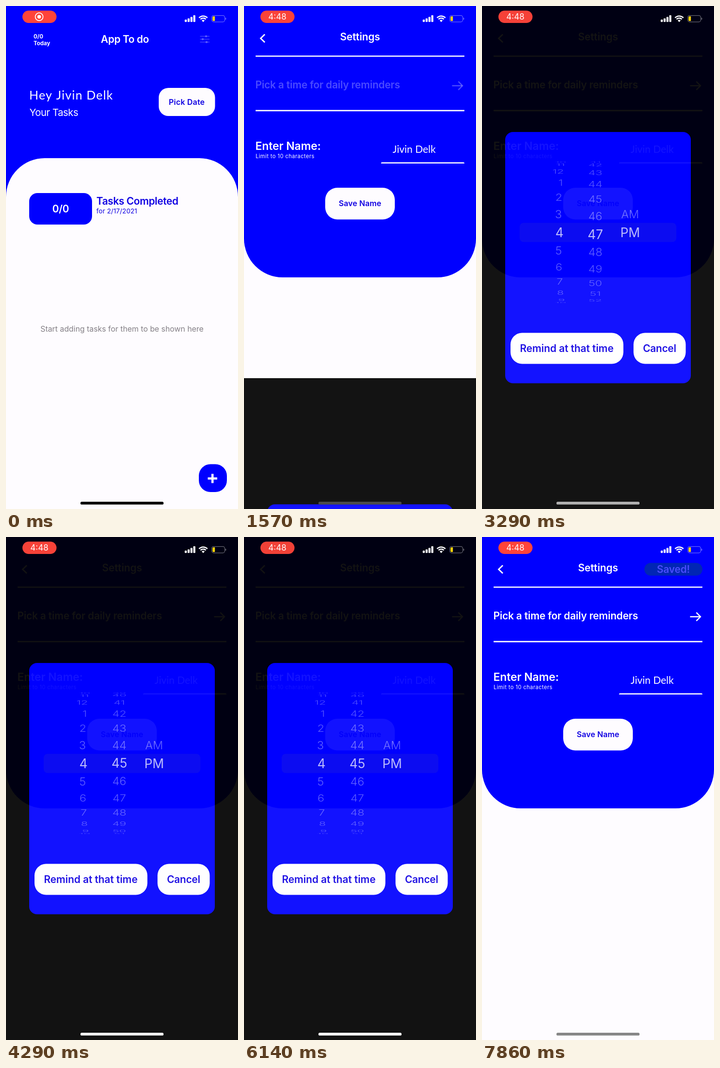
Recreate the animation shown at these times as an HTML page with a canvas. Size 480 by 1038 pixels, loop 8000 ms.

```html
<!DOCTYPE html>
<html lang="en">
<head>
<meta charset="utf-8">
<title>To-do app settings</title>
<style>
html, body { margin: 0; width: 100%; height: 100%; overflow: hidden; background: #fefcff; }
canvas { display: block; width: 480px; height: 1038px; }
</style>
</head>
<body>
<canvas id="stage" width="480" height="1038"></canvas>
<script>
const W = 480, H = 1038, LOOP = 8000;
const BLUE = '#0000ff', INK = '#1000e2', PAPER = '#fefcff', WHITE = '#ffffff';
const SANS = 'Inter, "Liberation Sans", sans-serif';
const HAND = 'Lato, "Open Sans", sans-serif';
const NAME = 'Jivin Delk';

const screen = document.getElementById('stage').getContext('2d');
const layer = document.createElement('canvas');
layer.width = W;
layer.height = H;
const layerCtx = layer.getContext('2d');
let ctx = screen;

// ---- timing ----
const clamp = (v) => Math.max(0, Math.min(1, v));
const ramp = (t, from, to) => clamp((t - from) / (to - from));
const smooth = (u) => u * u * (3 - 2 * u);
const inOut = (u) => u < 0.5 ? 2 * u * u : 1 - 2 * (1 - u) * (1 - u);

// Critically damped spring from 0 to 1
function spring(t, start) {
  const w = 0.0178 * Math.max(0, t - start);
  return 1 - (1 + w) * Math.exp(-w);
}

// Opacity of a touchable that dims while held
function touch(t, down, up) {
  if (t < up) return 1 - 0.75 * inOut(ramp(t, down, down + 150));
  return 0.25 + 0.75 * inOut(ramp(t, up, up + 250));
}

function track(t, points) {
  for (let i = 1; i < points.length; i++) {
    const [t0, v0] = points[i - 1], [t1, v1] = points[i];
    if (t <= t1) return v0 + (v1 - v0) * ramp(t, t0, t1);
  }
  return points[points.length - 1][1];
}

// ---- drawing helpers ----
function box(x0, y0, x1, y1, r, color) {
  ctx.fillStyle = color;
  ctx.beginPath();
  ctx.roundRect(x0, y0, x1 - x0, y1 - y0, r);
  ctx.fill();
}

function line(points, width, color, cap = 'butt') {
  ctx.strokeStyle = color;
  ctx.lineWidth = width;
  ctx.lineCap = cap;
  ctx.lineJoin = 'miter';
  ctx.beginPath();
  points.forEach(([x, y]) => ctx.lineTo(x, y));
  ctx.stroke();
}

function dot(x, y, r, color) {
  ctx.fillStyle = color;
  ctx.beginPath();
  ctx.arc(x, y, r, 0, 7);
  ctx.fill();
}

function text(str, x, y, size, color, { weight = 400, align = 'left', gap = 0, face = SANS } = {}) {
  ctx.font = `${weight} ${size}px ${face}`;
  ctx.letterSpacing = gap + 'px';
  ctx.textAlign = align;
  ctx.fillStyle = color;
  ctx.fillText(str, x, y);
}

const title = (str, x, y, color, align = 'left', gap = -0.25) =>
  text(str, x, y, 20.9, color, { weight: 600, align, gap });

function faded(alpha, draw) {
  ctx.save();
  ctx.globalAlpha *= alpha;
  draw();
  ctx.restore();
}

// Draws a group flat, then blends it as one picture
function grouped(alpha, y, draw) {
  ctx = layerCtx;
  ctx.clearRect(0, 0, W, H);
  draw();
  ctx = screen;
  faded(alpha, () => ctx.drawImage(layer, 0, y));
}

// ---- screens ----
function drawHome(t) {
  box(0, 0, W, H, 0, BLUE);
  box(0, 314, W, H, [80, 80, 0, 0], PAPER);
  text('0/0', 57, 67, 11.5, WHITE, { weight: 700 });
  text('Today', 57, 81, 11.5, WHITE, { weight: 700 });
  title('App To do', 246, 76, WHITE, 'center', -0.35);
  faded(touch(t, -400, 90), () => {
    [[62.5, 414], [68.5, 407], [74.5, 415]].forEach(([y, x]) => {
      line([[402, y], [420.5, y]], 1.5, WHITE, 'round');
      dot(x, y, 2.2, WHITE);
    });
  });
  text('Hey ' + NAME, 48, 193, 25, WHITE, { face: HAND, gap: 1.2 });
  text('Your Tasks', 48.5, 227, 20.4, WHITE, { gap: -0.5 });

  box(316, 169, 432.5, 227, 20, PAPER);
  text('Pick Date', 374, 204, 16, INK, { weight: 600, align: 'center', gap: 0.2 });
  box(48, 386, 178, 451, 17, BLUE);
  title('0/0', 113, 426, WHITE, 'center');
  title('Tasks Completed', 187, 409.5, INK, 'left', -0.35);
  text('for 2/17/2021', 187, 428, 13.5, INK, { gap: 0.1 });
  text('Start adding tasks for them to be shown here', 240, 671.5, 15.9, '#858087', { align: 'center', gap: -0.01 });

  box(399, 945.5, 457, 1003, 24, BLUE);
  line([[417.5, 975], [437, 975]], 4.6, WHITE);
  line([[427.2, 965.5], [427.2, 984.5]], 4.6, WHITE);
}

function drawSettings(t) {
  box(0, 0, W, H, 0, PAPER);
  box(0, 0, W, 560, [0, 0, 80, 80], BLUE);
  line([[43, 58.5], [34.5, 66.8], [43, 75]], 2.8, WHITE);
  title('Settings', 240, 71, WHITE, 'center', -0.1);
  box(24, 102.2, 456, 104.8, 0, WHITE);
  box(24, 214.6, 456, 217.2, 0, WHITE);

  faded(touch(t, 1300, 1530), () => {
    title('Pick a time for daily reminders', 23.5, 170, WHITE, 'left', -0.18);
    line([[430.5, 164.5], [451.5, 164.5]], 2.5, WHITE);
    line([[443.5, 155.8], [452, 164.5], [443.5, 173.2]], 2.5, WHITE);
  });

  text('Enter Name:', 23.5, 297, 23, WHITE, { weight: 600, gap: -0.12 });
  text('Limit to 10 characters', 24, 314, 11.1, WHITE, { gap: 0.45 });
  text(NAME, 307.5, 303, 21, WHITE, { face: HAND });
  box(283.5, 322.4, 456, 325, [2, 2, 0, 0], WHITE);
  box(168, 375, 312, 440.5, 25, PAPER);
  text('Save Name', 240, 413, 16, INK, { weight: 600, align: 'center', gap: 0.1 });
}

function drawBadge(t) {
  if (t < 6430) return;
  grouped(1 - inOut(ramp(t, 6630, 8630)), 0, () => {
    box(336, 53.5, 456, 79.8, 13, '#048004');
    title('Saved!', 396, 74, WHITE, 'center', -0.15);
  });
}

// ---- time picker ----
const MID = 467, STEP = 0.26, RADIUS = 145;
const COLUMNS = [
  { label: (i) => String((i + 11) % 12 + 1), align: 'right', x: (k) => 165 + 0.27 * k * k, big: 168.8, pos: () => 4 },
  { label: (i) => String(i % 60).padStart(2, '0'), align: 'center', x: () => 234.5, big: 234.5,
    pos: (t) => 48 - 3 * smooth(ramp(t, 2550, 4350)) },
  { label: (i) => ['AM', 'PM'][i] || '', align: 'center', x: () => 306.5, big: 306.5, pos: () => 1 }
];

function drawColumn(col, t, big) {
  const pos = col.pos(t), reach = big ? 1 : 6;
  for (let i = Math.floor(pos) - reach; i <= Math.ceil(pos) + reach; i++) {
    const k = i - pos, angle = k * STEP;
    if (Math.abs(angle) > 1.58) continue;
    const size = big ? 26.4 : 23.5;
    faded(big ? 0.78 : 0.44 - 0.03 * Math.abs(k), () => {
      ctx.translate(big ? col.big : col.x(k), MID + RADIUS * Math.sin(angle) * (big ? 1.1 : 1));
      ctx.scale(1, Math.max(0.1, Math.cos(angle)));
      text(col.label(i), 0, size * 0.364, size, WHITE, { align: col.align, weight: big ? 400 : 300 });
    });
  }
}

function drawPicker(t) {
  box(78, 447.5, 402, 487, 8, 'rgba(118,118,128,0.12)');
  [false, true].forEach((big) => {
    ctx.save();
    ctx.beginPath();
    ctx.rect(78, 447.5, 324, 39.5);
    if (!big) ctx.rect(48, 260, 384, 518);
    ctx.clip('evenodd');
    COLUMNS.forEach((col) => drawColumn(col, t, big));
    ctx.restore();
  });
}

function drawModal(t) {
  const y = H * (1 - spring(t, 1515.5) + spring(t, 6485.8));
  if (y >= H - 0.5) return;
  grouped(0.925, y, () => {
    box(0, 0, W, H, 0, '#000');
    box(48, 260, 432, 778.5, 16, BLUE);
    drawPicker(t);
    faded(touch(t, 6270, 6430), () => {
      box(59, 674.5, 292.5, 738.5, 24, WHITE);
      title('Remind at that time', 175.3, 714, INK, 'center', -0.04);
    });
    box(313.5, 674.5, 421.5, 738.5, 24, WHITE);
    title('Cancel', 367.3, 714, INK, 'center');
  });
}

// ---- system overlay ----
function drawStatus(t) {
  const wave = (1 + Math.cos((t - 6570) / 2800 * 2 * Math.PI)) / 2;
  const dim = 1 - 0.13 * wave ** 4;
  box(34, 9.5, 104.5, 35, 12.7, `rgb(${255 * dim},${68 * dim},${58 * dim})`);
  const clock = ramp(t, 570, 800);
  faded(1 - clock, () => {
    ctx.strokeStyle = WHITE;
    ctx.lineWidth = 1.8;
    ctx.beginPath();
    ctx.arc(68.6, 22.2, 8, 0, 7);
    ctx.stroke();
    dot(68.6, 22.2, 3.8, WHITE);
  });
  faded(clock, () => text('4:48', 69, 28.2, 17, WHITE, { align: 'center' }));

  [5, 7.5, 10.5, 14].forEach((h, i) => box(369.8 + i * 5.9, 33 - h, 374 + i * 5.9, 33, 1.2, WHITE));

  ctx.strokeStyle = WHITE;
  ctx.lineCap = 'butt';
  ctx.lineWidth = 2.6;
  [7.6, 11.9].forEach((r) => {
    ctx.beginPath();
    ctx.arc(408, 32.6, r, -Math.PI * 0.76, -Math.PI * 0.24);
    ctx.stroke();
  });
  ctx.fillStyle = WHITE;
  ctx.beginPath();
  ctx.moveTo(408, 33.2);
  ctx.arc(408, 32.6, 4.2, -Math.PI * 0.76, -Math.PI * 0.24);
  ctx.fill();

  ctx.strokeStyle = 'rgba(255,255,255,0.4)';
  ctx.lineWidth = 1.2;
  ctx.beginPath();
  ctx.roundRect(425.6, 19.6, 27, 13.2, 4);
  ctx.stroke();
  box(453.8, 24, 455.4, 28.4, [0, 1.6, 1.6, 0], 'rgba(255,255,255,0.45)');
  box(427.3, 21.3, 432.2, 31.1, [2.2, 1, 1, 2.2], '#ffd60a');
}

function drawIndicator(t) {
  const g = track(t, [[0, 0], [1400, 0], [1570, 75], [1860, 97], [3290, 177], [4500, 255], [6700, 255], [7860, 134], [8000, 120]]);
  box(154, 1023, 326, 1028.8, 2.9, `rgb(${g},${g},${g})`);
}

function render(t) {
  const push = spring(t, 180);
  const moving = push < 0.999;
  if (moving) {
    ctx.save();
    ctx.translate(-0.3 * W * push, 0);
    drawHome(t);
    ctx.restore();
  }
  ctx.save();
  ctx.translate(moving ? W * (1 - push) : 0, 0);
  drawSettings(t);
  ctx.restore();
  drawBadge(t);
  drawModal(t);
  drawStatus(t);
  drawIndicator(t);
}

const began = performance.now();
function tick() {
  render((performance.now() - began) % LOOP);
  requestAnimationFrame(tick);
}
tick();
</script>
</body>
</html>
```
